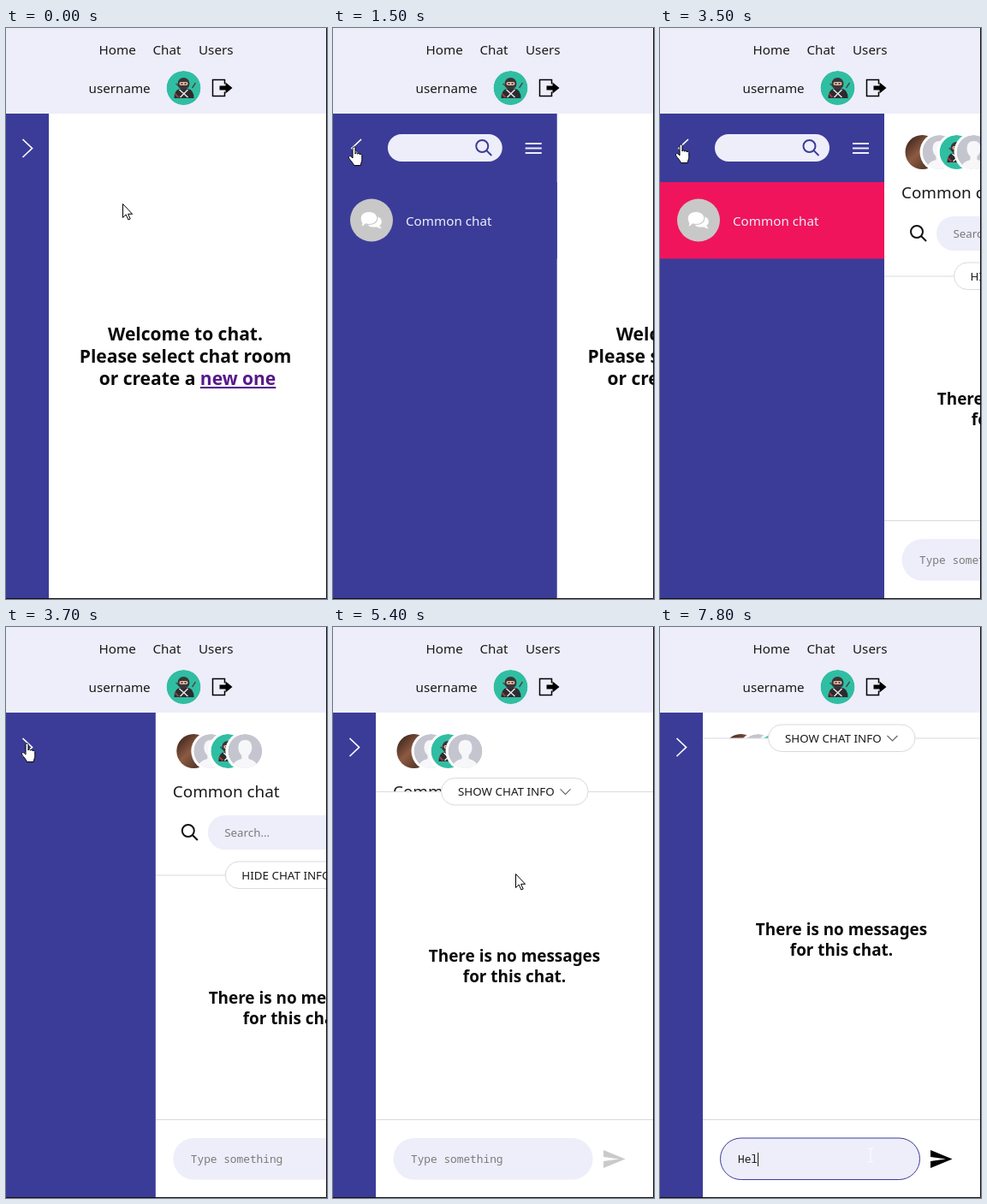
Write an HTML page that moves like this. It is 375 px wide and 667 px high and loops after 8000 ms.

```html
<!DOCTYPE html>
<html lang="en">
<head>
<meta charset="utf-8">
<title>Chat sidebar demo</title>
<style>
  html, body { margin: 0; height: 100%; overflow: hidden; }
  svg { display: block; width: 100vw; height: 100vh; background: #fefffe; }
  text { font: 15.2px "Noto Sans", "Open Sans", sans-serif; fill: #1a1a1a; white-space: pre; }
  .big { font-weight: 700; font-size: 21px; fill: #0a0a0a; text-anchor: middle; }
  .mid { font-size: 18.9px; }
  .small { font-size: 13.4px; }
  .mono { font: 12.8px "Noto Sans Mono", "DejaVu Sans Mono", monospace; }
  .hint { fill: #7a7a7a; }
  .link { fill: #551a8b; text-decoration: underline; }
  .line { fill: none; stroke: #d9d9e2; }
  .stroke { fill: none; stroke-width: 2; }
</style>
</head>
<body>
<svg viewBox="0 0 375 667">
  <defs>
    <linearGradient id="photo" x2="1" y2="1">
      <stop offset="0" stop-color="#2a1a16"/>
      <stop offset=".45" stop-color="#8d5a41"/>
      <stop offset="1" stop-color="#30201b"/>
    </linearGradient>
    <clipPath id="round"><circle r="20"/></clipPath>
    <clipPath id="infoClip"><rect id="infoBox" x="50" y="100" width="330" height="190"/></clipPath>
    <clipPath id="sideClip"><rect id="sideBox" y="100" width="50" height="567"/></clipPath>
    <g id="ninja" clip-path="url(#round)">
      <circle r="20" fill="#30bea2"/>
      <path d="M-9-5L9 11M10 0L14-6" stroke="#4b4b4b" stroke-width="1.5"/>
      <path d="M-11 12Q-11 2-4 1H5Q12 2 12 12Z" fill="#2d2a30"/>
      <circle cy="-5" r="7" fill="#38353b"/>
      <rect x="-5" y="-7" width="10" height="4" rx="2" fill="#e9bd9b"/>
      <path d="M-3-5H-1M1-5H3" stroke="#222" stroke-width="1.5"/>
      <path d="M-5 2L5 11M5 2L-4 11" stroke="#e5e5e5" stroke-width="1.5"/>
      <path d="M-10 7L-6 11" stroke="#a33a36" stroke-width="2"/>
    </g>
    <g id="person" clip-path="url(#round)">
      <circle r="20" fill="#c4c5cf"/>
      <path d="M-15 20Q-14 11-4 9V5Q-8 1-8-4Q-8-13 0-13T8-4Q8 1 4 5V9Q14 11 15 20Z" fill="#f7f7fa"/>
    </g>
    <g id="leave">
      <path d="M15 6V1H1V20H15V15" fill="none" stroke="currentColor" stroke-width="1.5"/>
      <path d="M9 8H16V4L24 10.500L16 17V13H9Z" fill="currentColor"/>
    </g>
    <g id="lens" class="stroke"><circle r="7"/><path d="M5 5L11 11"/></g>
  </defs>

  <g id="main">
    <g id="welcome">
      <text class="big" x="209.500" y="365">Welcome to chat.</text>
      <text class="big" x="209.500" y="391">Please select chat room</text>
      <text class="big" x="212" y="417">or create a <tspan class="link">new one</tspan></text>
    </g>
    <g id="chat">
      <g clip-path="url(#infoClip)">
        <g id="members"></g>
        <text class="mid" x="70" y="199">Common chat</text>
        <use href="#lens" x="88" y="238" stroke="#111"/>
        <rect x="111" y="220" width="203" height="40" rx="20" fill="#eeedfa"/>
        <text class="hint" style="font-size:13.300px" x="130.500" y="245">Search...</text>
        <use href="#leave" x="322" y="229.500" color="#c6c6c6"/>
      </g>
      <g id="toggle">
        <path class="line" d="M50 290H374"/>
        <rect id="pill" class="line" y="274" height="31.500" rx="15.750" style="fill:#fefffe"/>
        <text id="toggleText" class="small" y="295"></text>
        <path id="caretIcon" fill="none" stroke="#666" stroke-width="1.200"/>
      </g>
      <g id="empty">
        <text class="big mid" x="212" y="440">There is no messages</text>
        <text class="big mid" x="212" y="464">for this chat.</text>
      </g>
      <path class="line" d="M50 575.500H374"/>
      <rect id="field" x="70.500" y="597" width="233" height="48.500" rx="24.250" fill="#eeedfa"/>
      <text id="typed" class="mono" x="91" y="626"></text>
      <path id="caret" stroke="#111"/>
      <path id="send" d="M316 611L341.500 621.500L316 632V624L334 621.500L316 619Z"/>
    </g>
  </g>

  <g clip-path="url(#sideClip)">
    <rect y="100" width="375" height="567" fill="#3b3c98"/>
    <g id="rooms">
      <rect id="row" y="180" width="375" height="89.500"/>
      <circle cx="45" cy="224.500" r="25" fill="#c8c8c8"/>
      <g fill="#fff" stroke="#c8c8c8" stroke-width="1.200">
        <path d="M50 219Q58 221 57.500 227Q57 230 55 231L58 235Q53 235 51 233Q43 234 40 230Z"/>
        <path d="M34 229Q32 225 32 222Q33 214.500 42 214.500T52 222Q51 229.500 42 229.500L38 229Q36 232 32 232Z"/>
      </g>
      <text id="roomName" x="85" y="231" style="fill:#eeedfa">Common chat</text>
      <path id="search" fill="#eeedfa"/>
      <use id="searchIcon" href="#lens" y="138" stroke="#3b3c98"/>
      <path id="menu" class="stroke" stroke="#eeedfa" d="M-9.500 135H9.500M-9.500 140.500H9.500M-9.500 146H9.500"/>
    </g>
    <path id="arrow" fill="none" stroke="#fff" stroke-width="1.700"/>
  </g>

  <rect width="375" height="100" fill="#eeedfa"/>
  <text x="108.500" y="31">Home</text>
  <text x="171.500" y="31">Chat</text>
  <text x="225" y="31">Users</text>
  <text x="96.500" y="76">username</text>
  <use href="#ninja" x="207.500" y="70"/>
  <use href="#leave" x="240.500" y="59.500" color="#000"/>
  <path d="M374.500 0V666.500H0" fill="none" stroke="#111"/>

  <path id="cursor" stroke-linejoin="round"/>
</svg>
<script>
const ui = {};
document.querySelectorAll('[id]').forEach(el => ui[el.id] = el);
const set = (el, attrs) => { for (const k in attrs) el.setAttribute(k, attrs[k]); };
const show = (el, on) => el.style.display = on ? '' : 'none';
const shift = (el, x, y) => set(el, { transform: `translate(${x} ${y})` });
const ramp = (t, start, length) => {
  const p = Math.min(1, Math.max(0, (t - start) / length));
  return p * p * (3 - 2 * p);
};

const LOOP = 8000, OPEN = 1188, PICK = 2600, CLOSE = 3560, HIDE = 5160, FOCUS = 6500;
const SLIDE = 320;

// pointer hot spot: time, x, y
const track = [
  [0, 136, 205], [400, 136, 205], [900, 24, 139], [1600, 24, 139],
  [2300, 36, 211], [2800, 36, 211], [3400, 24, 136], [4200, 24, 136],
  [4300, 50, 178], [4700, 213, 288], [5700, 213, 288], [6100, 217, 559],
  [6300, 246, 617], [LOOP, 246, 617]
];
const shapes = {
  arrow: 'M.5 .5V16.500l3.700-3.500 2.700 6 2.300-1-2.600-5.700h5z',
  hand: 'M-1 1.500c0-2 3-2 3 0V8c0-1.500 2.700-1.500 2.700.3 0-1.300 2.600-1.200 2.600.6 0-1 2.500-.9 2.500.7v5c0 3-1.500 4-1.500 7H.5c0-2-5.500-7-6-9.300C-6 10.500-4 10-2.500 11.500L-1 13z',
  beam: 'M-3-8H-1L0-7 1-8H3M0-7V7M-3 8H-1L0 7 1 8H3'
};

ui.members.innerHTML = [0, 1, 2, 3].map(i =>
  `<g transform="translate(${94.5 + 20 * i} 145)"><circle r="23" fill="#fefffe"/>` +
  (i ? `<use href="#${i === 2 ? 'ninja' : 'person'}"/>` : '<circle r="20" fill="url(#photo)"/>') + '</g>'
).join('');

function pointer(t) {
  const i = track.findIndex(k => k[0] > t);
  const [t0, x0, y0] = track[i - 1], [t1, x1, y1] = track[i];
  const p = (t - t0) / (t1 - t0);
  return [x0 + (x1 - x0) * p, y0 + (y1 - y0) * p];
}

function drawSidebar(t, open, hover) {
  const w = 50 + 212 * (ramp(t, OPEN, SLIDE) - ramp(t, CLOSE, SLIDE));
  const k = (w - 109) / 153;
  set(ui.sideBox, { width: w });
  shift(ui.main, w - 50, 0);
  show(ui.rooms, open);
  show(ui.roomName, w > 200);
  set(ui.row, { fill: t >= PICK ? '#f0145c' : hover ? '#1f205f' : '#3b3c98' });

  const left = 36 + 28 * k, right = 73 + 125 * k, r = Math.min(16, Math.max(0, right - left));
  const end = w > 250 ? `H${right - 16}a16 16 0 0 1 0 32` : `H${right}v32`;
  set(ui.search, { d: `M${left + r} 124${end}H${left + r}a${r} 16 0 0 1 0-32z` });
  set(ui.searchIcon, { x: right - 23.5 });
  shift(ui.menu, 86.5 + 148 * k, 0);

  const x = open ? 17.5 + 4.5 * k : 19.5;
  const [tip, back] = open ? [x, x + 11] : [x + 11, x];
  set(ui.arrow, { d: `M${back} 130L${tip} 140.500L${back} 151` });
}

function drawChat(t) {
  show(ui.welcome, t < PICK);
  show(ui.chat, t >= PICK);
  const p = ramp(t, HIDE, 420), hidden = t >= HIDE;
  set(ui.infoBox, { height: 190 - 160 * p });
  shift(ui.toggle, 0, -160 * p);
  shift(ui.empty, 0, -80 * p);
  set(ui.pill, hidden ? { x: 126.5, width: 171.5 } : { x: 131.5, width: 162.5 });
  set(ui.toggleText, { x: hidden ? 146 : 150.5 });
  ui.toggleText.textContent = hidden ? 'SHOW CHAT INFO' : 'HIDE CHAT INFO';
  set(ui.caretIcon, { d: hidden ? 'M265.500 287l6 6 6-6' : 'M260.500 293l6-6 6 6' });

  const count = [7500, 7700, 7800].filter(k => t >= k).length;
  ui.typed.textContent = count ? 'Hel'.slice(0, count) : 'Type something';
  ui.typed.classList.toggle('hint', !count);
  set(ui.field, { stroke: t >= FOCUS ? '#3b3c98' : 'none' });
  set(ui.caret, { d: `M${91.5 + 7.7 * count} 614V630` });
  show(ui.caret, t >= FOCUS && (t < 7000 || count));
  set(ui.send, { fill: count ? '#000' : '#cacaca' });
}

function draw(t) {
  const [x, y] = pointer(t);
  const open = t >= OPEN && t < CLOSE;
  const onRow = open && y > 180 && y < 269;
  const onArrow = x < 40 && y > 125 && y < 156;
  const onToggle = t > 4620 && t < HIDE + 100;
  const kind = y > 597 ? 'beam' : onRow || onArrow || onToggle ? 'hand' : 'arrow';
  drawSidebar(t, open, onRow);
  drawChat(t);
  set(ui.cursor, {
    d: shapes[kind],
    fill: kind === 'beam' ? 'none' : '#fff',
    stroke: kind === 'beam' ? '#fff' : '#000'
  });
  shift(ui.cursor, x, y);
}

const start = performance.now();
function tick() {
  draw((performance.now() - start) % LOOP);
  requestAnimationFrame(tick);
}
tick();
</script>
</body>
</html>
```
